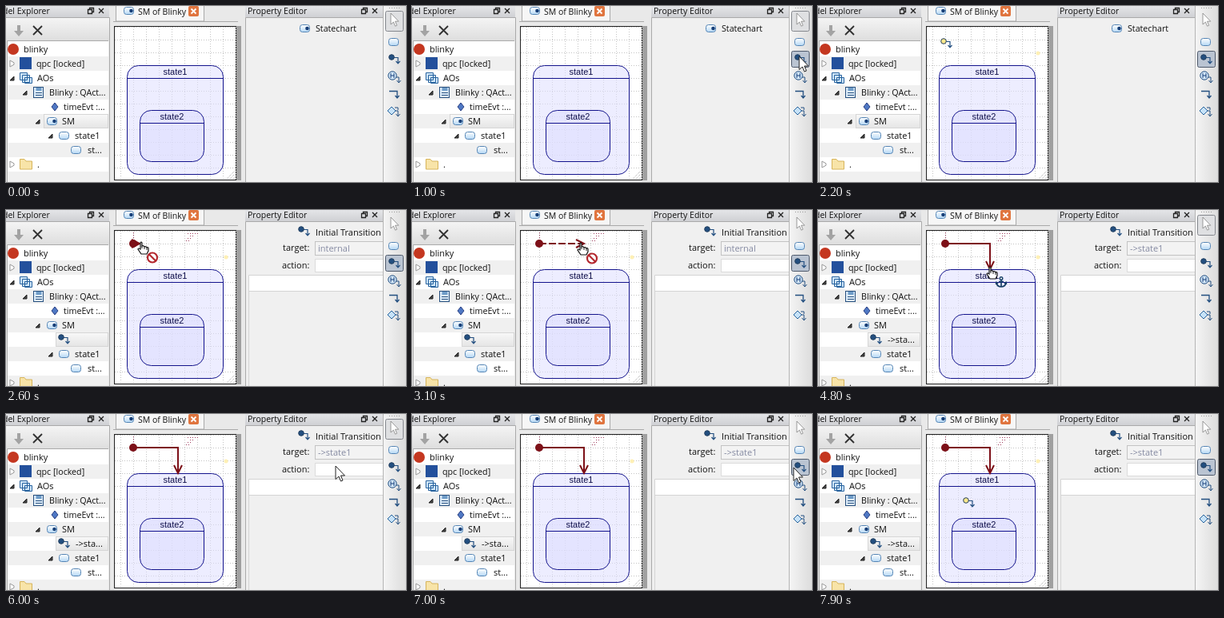
Write an HTML page that moves like this. It is 500x220 px and loops after 8 s.

```html
<!DOCTYPE html>
<html lang="en">
<head>
<meta charset="utf-8">
<title>Drawing an initial transition</title>
<style>
html, body { margin: 0; width: 100%; height: 100%; overflow: hidden; background: #f0f0f0; }
svg { display: block; }
text { font: 11px "Open Sans", "Noto Sans", sans-serif; fill: #111; white-space: pre; }
.wide { font-size: 10.7px; }
.title { font-size: 10.5px; }
.dim { fill: #858aa2; }
.name { font-family: "Liberation Sans", sans-serif; fill: #10104a; text-anchor: middle; }
.state { fill: #dedeff; fill-opacity: .55; stroke: #14148c; }
.grid { stroke: #c4c4c4; stroke-dasharray: 1 2; }
.wire { fill: none; stroke: #7d1018; stroke-width: 2; }
.residue { fill: none; stroke: #a04060; stroke-dasharray: 1 2; }
.button { fill: #dfe0e2; stroke: #85888e; }
.sunk { fill: #bac4d2; stroke: #4f5a6c; }
</style>
</head>
<body>
<svg id="stage" width="500" height="220" viewBox="0 0 500 220">
<defs>
  <linearGradient id="title" x2="0" y2="1"><stop stop-color="#e4e5e8"/><stop offset="1" stop-color="#cfd0d4"/></linearGradient>
  <linearGradient id="bar" x2="0" y2="1"><stop stop-color="#f4f4f4"/><stop offset="1" stop-color="#dedede"/></linearGradient>
  <linearGradient id="side"><stop stop-color="#f5f5f5"/><stop offset="1" stop-color="#dcdcdc"/></linearGradient>
  <linearGradient id="chosen" x2="0" y2="1"><stop stop-color="#f8f8f8"/><stop offset="1" stop-color="#e5e5e5"/></linearGradient>
  <linearGradient id="pill" x2="0" y2="1"><stop stop-color="#fff"/><stop offset="1" stop-color="#b5d8f5"/></linearGradient>
  <clipPath id="sheet"><rect x="136" y="26" width="152" height="191"/></clipPath>
  <g id="box"><rect x=".5" y=".5" width="12" height="9" rx="3" fill="url(#pill)" stroke="#5585b5"/></g>
  <g id="chart"><use href="#box"/><circle cx="9.5" cy="5" r="2.3" fill="#173f78"/></g>
  <g id="init"><path d="M6 4.5H12V11M9.5 9L12 11.8L14.5 9" fill="none" stroke="#234f80" stroke-width="1.2"/><circle cx="4" cy="4" r="3.3" fill="currentColor" stroke="#234060"/></g>
  <path id="arrow" d="M0 0V16.5L4 13L6.5 19L9 18L6.5 12H11.5Z" fill="#fff"/>
  <path id="shut" d="M0 0L5 2.8V5.2L0 8Z" fill="#fff" stroke="#999"/>
  <path id="open" d="M5 0V5H0Z" fill="#444" stroke="#222"/>
  <path id="corner" d="M.5 4.5h5v5h-5zM2.5 4.5v-2h5v5h-2M14 3l6 6M20 3l-6 6" fill="none" stroke="#222" stroke-width="1.3"/>
</defs>
<g id="view"></g>
</svg>
<script>
const $ = id => document.getElementById(id);
const text = (x, y, s, cls = '') => `<text x="${x}" y="${y}" class="${cls}">${s}</text>`;
const rect = (x, y, w, h, fill, more = '') => `<rect x="${x}" y="${y}" width="${w}" height="${h}" fill="${fill}" ${more}/>`;
const path = (d, stroke, more = '') => `<path d="${d}" fill="none" stroke="${stroke}" ${more}/>`;
const use = (id, x, y, more = '') => `<use href="#${id}" x="${x}" y="${y}" ${more}/>`;
const group = (id, body) => `<g id="${id}">${body}</g>`;
const edge = color => `stroke="${color}"`;

function gridLines() {
  let d = '';
  for (let x = 143.5; x < 288; x += 16) d += `M${x} 26V217`;
  for (let y = 26.5; y < 217; y += 16) d += `M136 ${y}H288`;
  return `<path class="grid" d="${d}"/>`;
}

function stateBox(x, y, w, h, label) {
  return `<rect class="state" x="${x}.5" y="${y}.5" width="${w}" height="${h}" rx="14"/>` +
    path(`M${x} ${y + 16}.5h${w + 1}`, '#14148c') + text(x + w / 2 + .5, y + 12, label, 'name');
}

const stripes = [63, 99, 135, 171, 207].map(y => rect(2, y, 126, 18, '#f0f0f0')).join('');

const explorer =
  rect(0, 0, 130, 220, '#e9e9e9') + rect(0, 0, 129, 14, 'url(#title)') + text(-4, 10, 'del Explorer', 'title') +
  use('corner', 102, 0) +
  path('M0 14.5H129.5V220', '#aaa') + rect(0, 15, 129, 28, 'url(#bar)') +
  `<path d="M14 24h4v7h4l-6 7l-6 -7h4z" fill="#a3a3a3"/>` +
  path('M34 25L45 36M45 25L34 36', '#333', 'stroke-width="1.9"') +
  rect(2, 43, 126, 177, '#fff') + stripes + path('M1.5 220V43.5H128', '#aaa') +
  '<circle cx="9" cy="54" r="7" fill="#c43720"/>' + text(22, 58, 'blinky') +
  use('shut', 5, 68) + rect(17, 64, 15, 15, '#23509c') + text(38, 76, 'qpc [locked]', 'wide') +
  use('open', 5, 88) +
  `<path d="M17.5 83.5h9v9h-9zM20.500 86.5h9v9h-9zM23.500 89.5h9v7h-9z" fill="#cfe6fa" stroke="#28639e"/>` + text(39, 94, 'AOs') +
  use('open', 21, 106) + rect(34.5, 101.5, 12, 13, '#dcecfa', edge('#28507e')) +
  rect(37.5, 102, 7, 4, '#6f9cc8') + path('M37 108.500H45M37 111.5H45', '#28507e') + text(54, 112, 'Blinky : QAct...', 'wide') +
  `<path d="M61 121L65 126L61 131L57 126Z" fill="#4f78c4" stroke="#273d80"/>` + text(72, 130, 'timeEvt :...', 'wide') +
  group('rowChart', rect(47.5, 135.5, 80, 17, 'url(#chosen)', edge('#d6d6d6'))) +
  use('open', 37, 142) + use('chart', 51, 139) + text(70, 148, 'SM') +
  group('rowInit', rect(62.5, 153.5, 65, 17, 'url(#chosen)', edge('#d6d6d6')) + use('init', 65, 155, 'color="#234f80"') +
    `<text id="rowLabel" x="87" y="166"></text>`) +
  group('below',
    use('open', 53, 160) + use('box', 66, 157) + text(86, 166, 'state1') +
    use('box', 81, 175) + text(102, 184, 'st...') +
    use('shut', 5, 194) + `<path d="M17.5 204V191.5H23L25 194H32.5V204Z" fill="#f8e4a8" stroke="#d6b45c"/>` + text(39, 202, '.'));

const editor =
  rect(130, 0, 169, 220, '#e9e9e9') + path('M134 19.5H290', '#aaa') +
  rect(137.5, -4, 110, 23, '#f6f6f6', edge('#aaa')) + use('chart', 147, 1) + text(165, 11, 'SM of Blinky', 'title') +
  rect(228, 0, 13, 13, '#e0753f', 'rx="2"') + path('M231.5 3.5L237.5 9.5M237.5 3.5L231.5 9.5', '#fff', 'stroke-width="1.8"') +
  rect(288, 25, 6, 193, '#a0a0a0') + rect(135.5, 25.5, 152, 192, '#fff', edge('#222')) +
  `<g clip-path="url(#sheet)">` + gridLines() +
  stateBox(151, 74, 120, 136, 'state1') + stateBox(167, 130, 80, 64, 'state2') +
  path('M276 216L286 206M280 216L286 210M284 216L286 214', '#aaa', 'stroke-dasharray="1 1"') +
  group('glow', '<circle cx="275" cy="59" r="2.5" fill="#fff0b5"/>') +
  group('trans',
    `<path class="residue" d="M159.5 28V38M225 38.5H229M227 35.5H232M230 32.5H236M227 29.5H241"/>` +
    `<path id="wire" class="wire"/><path id="head" class="wire" d="M-10 -5L0 0L-10 5"/>` +
    '<circle cx="159" cy="42" r="5" fill="#7d1018"/>') + '</g>';

const properties =
  rect(299, 0, 172, 220, '#f0f0f0') + rect(299, 0, 172, 14, 'url(#title)') + text(302, 10, 'Property Editor', 'title') +
  path('M299.5 220V14.5H471', '#aaa') + use('corner', 444, 0) +
  group('noForm', use('chart', 367, 23) + text(387, 32, 'Statechart', 'wide')) +
  group('form',
    use('init', 365, 20, 'color="#234f80"') + text(387, 32, 'Initial Transition') +
    text(346, 51, 'target:') + rect(386.5, 39.5, 90, 17, '#f3f3f3', edge('#c3c3c3')) +
    `<text id="target" class="dim" x="390" y="52"></text>` +
    text(345, 73, 'action:') + rect(386.5, 61.5, 90, 16, '#fff', edge('#dcdcdc')) +
    rect(303, 82, 168, 19, '#fff') + path('M303.5 220V81.5H471M304 101.5H471', '#d4d4d4'));

const tools =
  rect(471, 0, 29, 220, 'url(#side)') + path('M471.5 0V220', '#b5b5b5') +
  path('M479 2.5H494', '#999', 'stroke-dasharray="1 2"') +
  '<rect id="pickArrow" class="button" x="474.5" y="6.5" width="22" height="25" rx="2"/>' +
  '<rect id="pickInit" x="474.5" y="56.5" width="22" height="20" rx="2"/>' +
  use('arrow', 0, 0, 'transform="translate(481 9) scale(.85)" stroke="#888"') +
  use('box', 478, 40) + use('init', 478, 60, 'color="#234f80"') +
  '<circle cx="483" cy="87" r="5.2" fill="#d4e8fa" stroke="#234f80"/>' + path('M481 84V90M485 84V90M481 87H485', '#173f78') +
  path('M488 89H491V95M488.5 93L491 96L493.5 93', '#234f80') +
  path('M479 106.5H489V114M486.5 112L489 115L491.5 112', '#234f80', 'stroke-width="1.3"') +
  `<path d="M482 126L487 131L482 136L477 131Z" fill="#c6e2f8" stroke="#28639e"/>` +
  path('M487 131H490V137M486 127H490V130M487.5 135L490 138L492.5 135', '#234f80');

const cursors = group('cursor',
  group('point', use('arrow', 0, 0, edge('#222'))) +
  group('place', use('init', 0, 0, 'color="#ffe98c"')) +
  group('grab',
    `<path d="M-2 7V0Q-1 -2 0 0V4Q2 3 3 5Q5 4 6 6Q8 5 8 7V10L6 14H-1L-5 8Q-5 6 -2 8Z" fill="#fff" stroke="#111" stroke-width="1.2"/>` +
    path('M0 4V7M3 5V8M6 6V9', '#222') +
    group('deny', '<circle cx="13" cy="18.5" r="6" fill="#fff" fill-opacity=".7" stroke="#b3262c" stroke-width="2.2"/>' +
      path('M9 14.5L17 22.5', '#b3262c', 'stroke-width="2.2"')) +
    group('anchor', '<circle cx="13" cy="13.5" r="1.8" fill="#fff" stroke="#173f66" stroke-width="1.4"/>' +
      path('M13 15V24M10 17.5H16M7 19Q8 24 13 24Q18 24 19 19M6.5 21L7 18.5L9 20M19.5 21L19 18.5L17 20', '#173f66', 'stroke-width="1.7"'))));

$('view').innerHTML = explorer + editor + properties + tools + cursors;

// Pointer position: [ms, x, y]
const track = [
  [300, 490, -22], [800, 484, 63], [1000, 484, 63], [1800, 156, 43], [1900, 155, 42], [2200, 153, 40],
  [2300, 159, 41], [2400, 159, 41], [3100, 212, 42], [3200, 215, 43], [4000, 216, 72], [5400, 216, 72],
  [6300, 481, 62], [6500, 484, 66], [6900, 484, 66], [7000, 477, 67], [7800, 183, 106], [7900, 181, 104], [8000, 181, 104]
];

function pointer(t) {
  const i = track.findIndex(k => k[0] >= t);
  if (i < 1) return track[0].slice(1);
  const [t0, x0, y0] = track[i - 1], [t1, x1, y1] = track[i];
  const u = (t - t0) / (t1 - t0), e = u * u * (3 - 2 * u);
  return [x0 + (x1 - x0) * e, y0 + (y1 - y0) * e].map(Math.round);
}

const show = (id, on) => $(id).style.display = on ? '' : 'none';
const snap = (v, from) => from + 8 * Math.max(0, Math.round((v - from) / 8));

function drawWire(t) {
  const [x, y] = pointer(Math.min(t, 4000));
  const ex = snap(x, 159), ey = snap(y, 42), down = ey > 42;
  $('wire').setAttribute('d', `M159 42H${ex}V${ey}`);
  $('wire').setAttribute('stroke-dasharray', t < 4800 ? '9 3' : 'none');
  $('head').setAttribute('transform', `translate(${ex} ${ey}) rotate(${down ? 90 : 0})`);
}

function draw(t) {
  const [x, y] = pointer(t);
  const made = t >= 2400, linked = t >= 4800;
  const grab = made && t < 5500;
  const picked = t >= 1100 && !linked || t >= 6700;
  const hover = t >= 700 && t < 1100 || t >= 6300 && t < 6700;
  const place = picked && !grab && x < 287;

  show('rowChart', !made);
  show('rowInit', made);
  show('noForm', !made);
  show('form', made);
  show('trans', made);
  show('glow', t >= 1500);
  $('below').setAttribute('transform', `translate(0 ${made ? 18 : 0})`);
  $('rowLabel').textContent = linked ? '->sta...' : '';
  $('target').textContent = linked ? '->state1' : 'internal';
  if (made) drawWire(t);

  show('pickArrow', !picked);
  show('pickInit', picked || hover);
  $('pickInit').setAttribute('class', picked || t >= 800 && t < 1100 ? 'sunk' : 'button');

  $('cursor').setAttribute('transform', `translate(${x} ${y})`);
  show('grab', grab);
  show('place', place);
  show('point', !grab && !place);
  show('deny', t < 4000);
  show('anchor', t >= 4000);
}

const start = performance.now();
function tick() {
  const t = (performance.now() - start) % 8000;
  draw(Math.floor(t / 100) * 100);
  requestAnimationFrame(tick);
}
tick();
</script>
</body>
</html>
```
